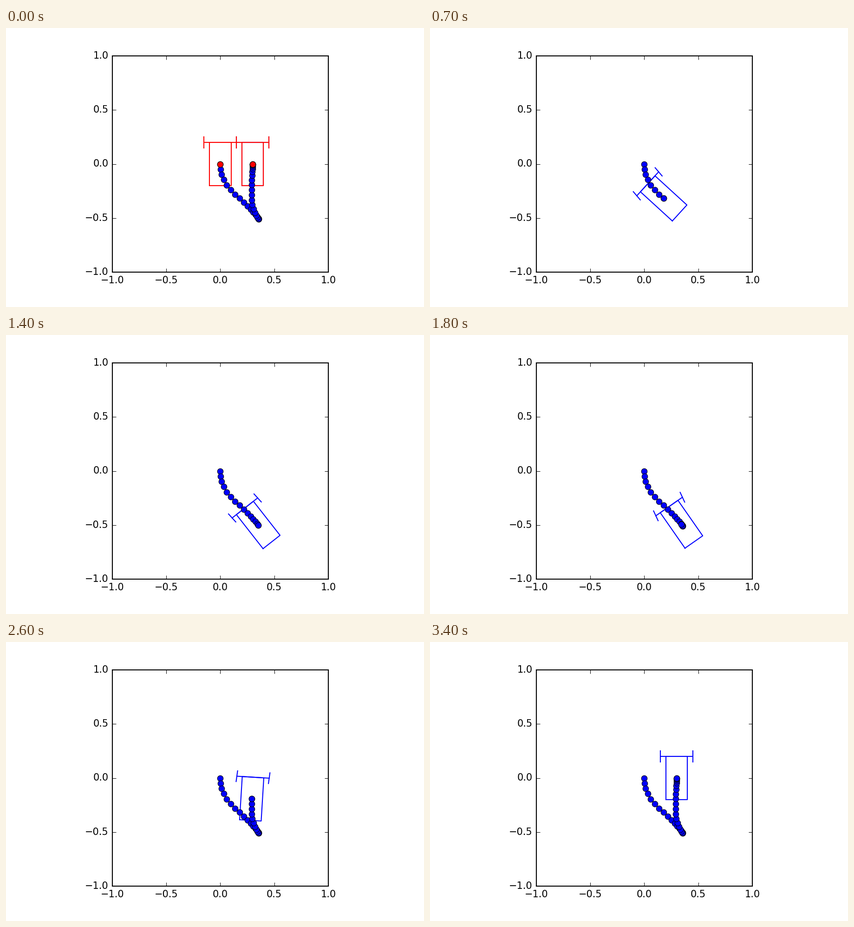
These frames come from a looping animation (900x600 px, 3.5 s). A matplotlib script:

```python
import numpy as np
import matplotlib.pyplot as plt
from matplotlib.animation import FuncAnimation

DPI = 150
STEPS = 35

plt.rcParams.update({
    "font.family": "DejaVu Sans",
    "font.size": 10,
    "lines.linewidth": 1.0,
    "lines.solid_capstyle": "projecting",
    "axes.linewidth": 1.0,
    "ytick.alignment": "center",
})

# Key poses of the manoeuvre: step, x, y, heading, steering (degrees)
KEYS = np.array([
    (0, 0, 0, 0, 0),
    (2, .013, -.096, 11.5, -14),
    (4, .060, -.195, 30.5, -16.5),
    (7, .180, -.318, 47.6, -7.3),
    (11, .306, -.446, 41.9, 8),
    (16, .358, -.508, 37.2, -3),
    (18, .345, -.4925, 34.9, -10),
    (22, .297, -.378, 14.8, -16),
    (26, .2915, -.192, -3.5, -4.5),
    (30, .2985, -.046, -1.8, 3.3),
    (34, .3, 0, 0, 0),
])


def spline(x, y, t):
    """Natural cubic spline through the rows of y, sampled at t."""
    n, h = len(x), np.diff(x)
    slope = np.diff(y, axis=0) / h[:, None]
    a, b = np.eye(n), np.zeros_like(y)
    for i in range(1, n - 1):
        a[i, i - 1:i + 2] = h[i - 1], 2 * (h[i - 1] + h[i]), h[i]
        b[i] = 6 * (slope[i] - slope[i - 1])
    m = np.linalg.solve(a, b)
    i = np.clip(np.searchsorted(x, t, side="right") - 1, 0, n - 2)
    u, v, w = (d[:, None] for d in (t - x[i], x[i + 1] - t, h[i]))
    return ((m[i] * v**3 + m[i + 1] * u**3) / (6 * w)
            + (y[i] / w - m[i] * w / 6) * v
            + (y[i + 1] / w - m[i + 1] * w / 6) * u)


poses = spline(KEYS[:, 0], KEYS[:, 1:], np.arange(STEPS))
path = poses[:, :2]
heading, steer = np.radians(poses[:, 2:]).T


def rotate(pts, angle):
    c, s = np.cos(angle), np.sin(angle)
    return np.array(pts) @ [[c, s], [-s, c]]


def car_shape(pos, angle, turn):
    body = [(-.1, -.2), (.1, -.2), (.1, .2), (-.1, .2), (-.1, -.2)]
    axle = [(-.15, .2), (.15, .2)]
    wheel = rotate([(0, -.05), (0, .05)], turn)
    parts = [body, axle, wheel + axle[0], wheel + axle[1]]
    return [pos + rotate(p, angle) for p in parts]


fig = plt.figure(figsize=(900 / DPI, 600 / DPI), dpi=DPI, facecolor="white")
ax = fig.add_axes([228.75 / 900, 75 / 600, 465 / 900, 465 / 600])
ticks = np.linspace(-1, 1, 5)
ax.set(xlim=(-1, 1), ylim=(-1, 1), xticks=ticks, yticks=ticks)
for axis in (ax.xaxis, ax.yaxis):
    axis.set_major_formatter("{x:.1f}")
ax.tick_params(direction="in", top=True, right=True,
               length=4, width=0.5, pad=4)


def make_dots(color, z):
    return ax.plot([], [], "o", color=color, ms=6, mec="black", mew=0.5,
                   zorder=z)[0]


def make_car(color, z):
    lines = [ax.plot([], [], color=color, zorder=z)[0] for _ in range(4)]
    return lines + [make_dots(color, z + 2)]


def place(car, pos, angle=0, turn=0):
    shape = car_shape(pos, angle, turn) + [np.array([pos])]
    for artist, pts in zip(car, shape):
        artist.set_data(*pts.T)


car = make_car("blue", 3)
trail = make_dots("blue", 4)
goals = [make_car("red", 3.5) for _ in range(2)]
for goal, pos in zip(goals, path[[0, -1]]):
    place(goal, pos)


def update(i):
    # The loop opens on the finished manoeuvre with start and goal marked
    k = i or STEPS - 1
    trail.set_data(*path[:k + 1].T)
    place(car, path[k], heading[k], steer[k])
    for artist in sum(goals, []):
        artist.set_visible(i == 0)


anim = FuncAnimation(fig, update, frames=STEPS, interval=100, repeat=True,
                     repeat_delay=0, init_func=lambda: None)
plt.show()
```
